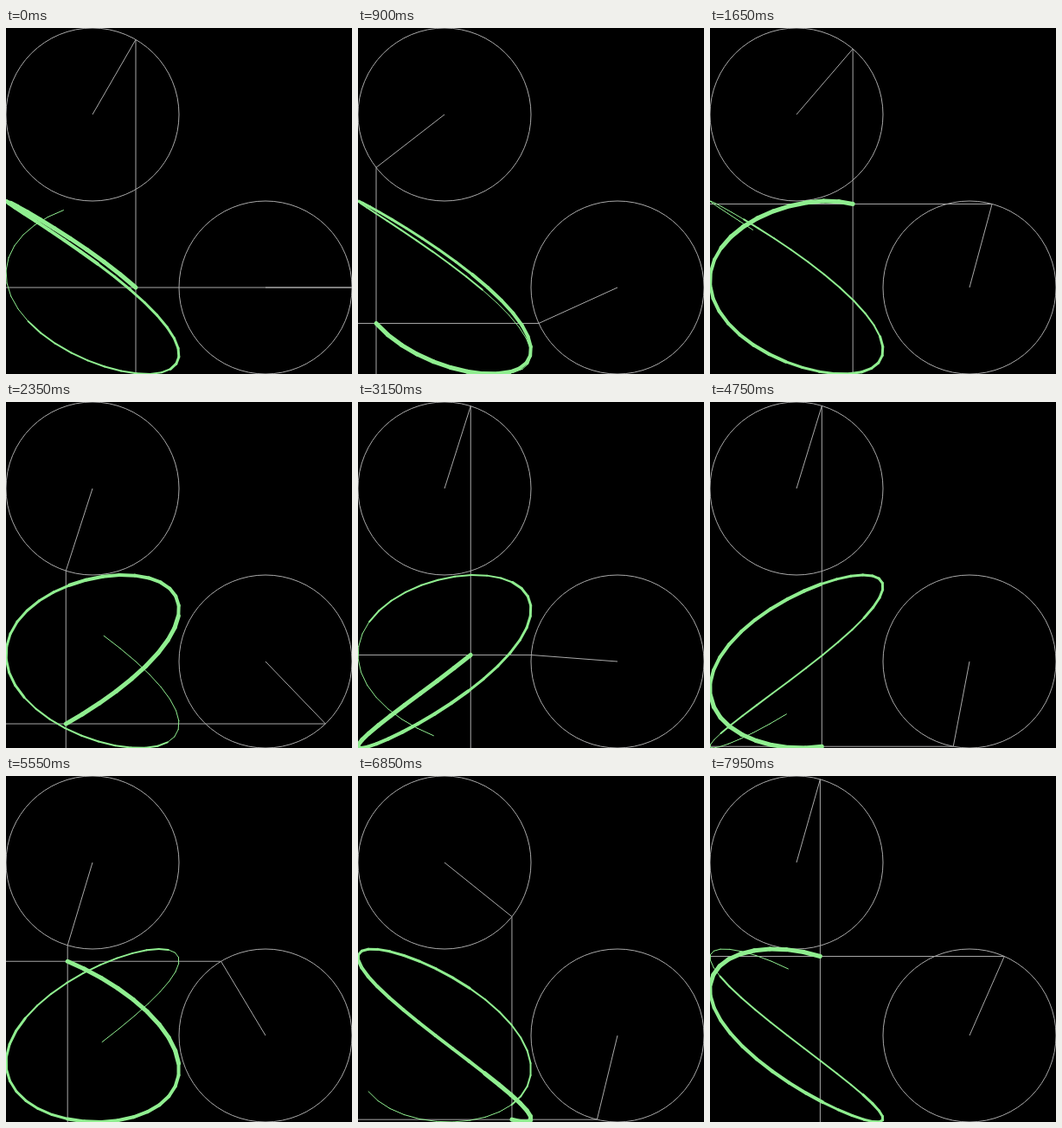
These frames come from a looping animation (400 px wide and 400 px high, 8 s). An HTML page with a canvas:

```html
<!DOCTYPE html>
<html>
<head>
<meta charset="utf-8">
<title>Lissajous trail</title>
<style>
  html, body { margin: 0; width: 100%; height: 100%; overflow: hidden; background: #000; }
  canvas { display: block; }
</style>
</head>
<body>
<canvas id="stage" width="400" height="400"></canvas>
<script>
const ctx = document.getElementById('stage').getContext('2d');
const TAU = 2 * Math.PI;
const RADIUS = 100;
const STEP_MS = 50, STEPS = 160;
const TRAIL = 50; // points kept behind the pen

const topAngle = step => -Math.PI / 3 + TAU * 0.0312 * step;
const sideAngle = step => TAU * 0.024 * step;
const onCircle = (cx, cy, angle) => [cx + RADIUS * Math.cos(angle), cy + RADIUS * Math.sin(angle)];
const penAt = step => [100 + RADIUS * Math.cos(topAngle(step)), 300 + RADIUS * Math.sin(sideAngle(step))];

function line(x1, y1, x2, y2) {
  ctx.beginPath();
  ctx.moveTo(x1, y1);
  ctx.lineTo(x2, y2);
  ctx.stroke();
}

function dial(cx, cy, tipX, tipY) {
  ctx.beginPath();
  ctx.arc(cx, cy, RADIUS, 0, TAU);
  ctx.stroke();
  line(cx, cy, tipX, tipY);
}

function draw(step) {
  ctx.fillStyle = '#000';
  ctx.fillRect(0, 0, 400, 400);

  ctx.strokeStyle = 'darkgray';
  ctx.lineWidth = 1;
  ctx.lineCap = 'butt';
  const [topX, topY] = onCircle(100, 100, topAngle(step));
  const [sideX, sideY] = onCircle(300, 300, sideAngle(step));
  dial(100, 100, topX, topY);
  dial(300, 300, sideX, sideY);
  line(topX, topY, topX, 400);
  line(0, sideY, sideX, sideY);

  // The trail thickens by one pixel every ten segments.
  ctx.strokeStyle = 'lightgreen';
  ctx.lineCap = 'round';
  const tail = step - TRAIL + 1;
  for (let i = 0; i < TRAIL - 1; i++) {
    ctx.lineWidth = 1 + Math.floor(i / 10);
    line(...penAt(tail + i), ...penAt(tail + i + 1));
  }
}

const start = performance.now();
function frame() {
  draw(Math.floor((performance.now() - start) / STEP_MS) % STEPS);
  requestAnimationFrame(frame);
}
frame();
</script>
</body>
</html>
```
